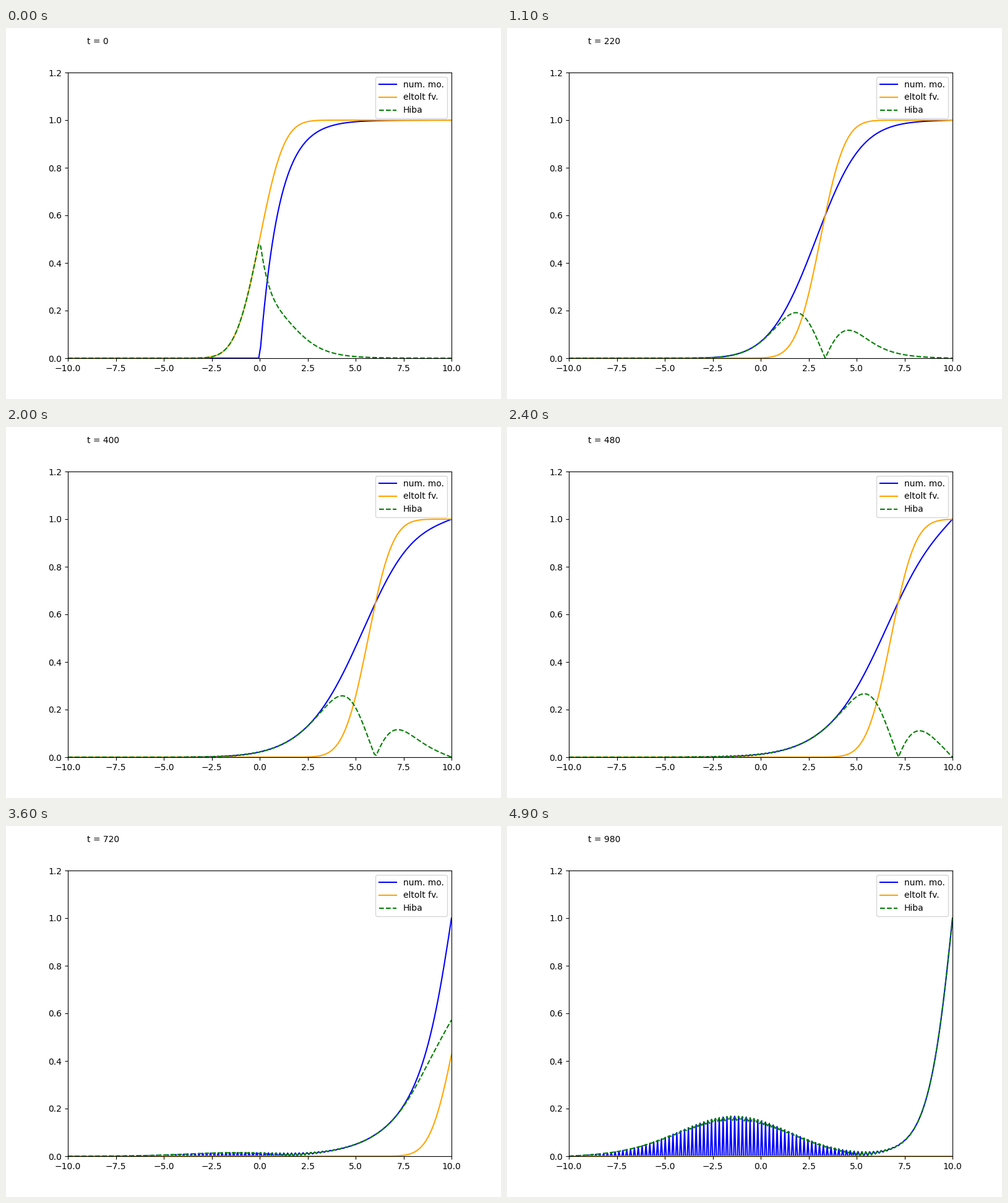
A matplotlib script for the animation above (5 s loop, 800x600 px).

```python
import math

import matplotlib.pyplot as plt
import numpy as np
from matplotlib.animation import FuncAnimation

FRAMES, INTERVAL = 50, 100
STEPS_PER_FRAME = 20
DT, DX = 0.01, 0.1
SPEED = math.sqrt(2)

x = np.linspace(-10, 10, 200)
normal_cdf = np.vectorize(lambda z: 0.5 * (1 + math.erf(z / math.sqrt(2))))


def solve():
    """Explicit scheme for u_t = u_xx / 2 + u^2 - u with fixed ends."""
    u = np.where(x > 0, 1 - np.exp(-x), 0.0)
    states = [u.copy()]
    for _ in range(FRAMES - 1):
        for _ in range(STEPS_PER_FRAME):
            mid = u[1:-1]
            diffusion = 0.5 * (u[2:] - 2 * mid + u[:-2]) / DX**2
            u[1:-1] = mid + DT * (diffusion + mid**2 - mid)
        states.append(u.copy())
    return states


states = solve()

fig, ax = plt.subplots(figsize=(8, 6), dpi=100)
ax.set_xlim(-10, 10)
ax.set_ylim(0, 1.2)
numeric, = ax.plot([], [], color="blue", label="num. mo.")
shifted, = ax.plot([], [], color="orange", label="eltolt fv.")
error, = ax.plot([], [], color="green", linestyle="--", label="Hiba")
ax.legend(loc="upper right")
label = ax.text(-9, 1.32, "")


def update(frame):
    step = frame * STEPS_PER_FRAME
    u = states[frame]
    front = normal_cdf(x - SPEED * DT * step)
    numeric.set_data(x, u)
    shifted.set_data(x, front)
    error.set_data(x, np.abs(u - front))
    label.set_text(f"t = {step}")
    return numeric, shifted, error, label


anim = FuncAnimation(fig, update, frames=FRAMES, interval=INTERVAL,
                     init_func=lambda: update(0), repeat=True, repeat_delay=0)
plt.show()
```
